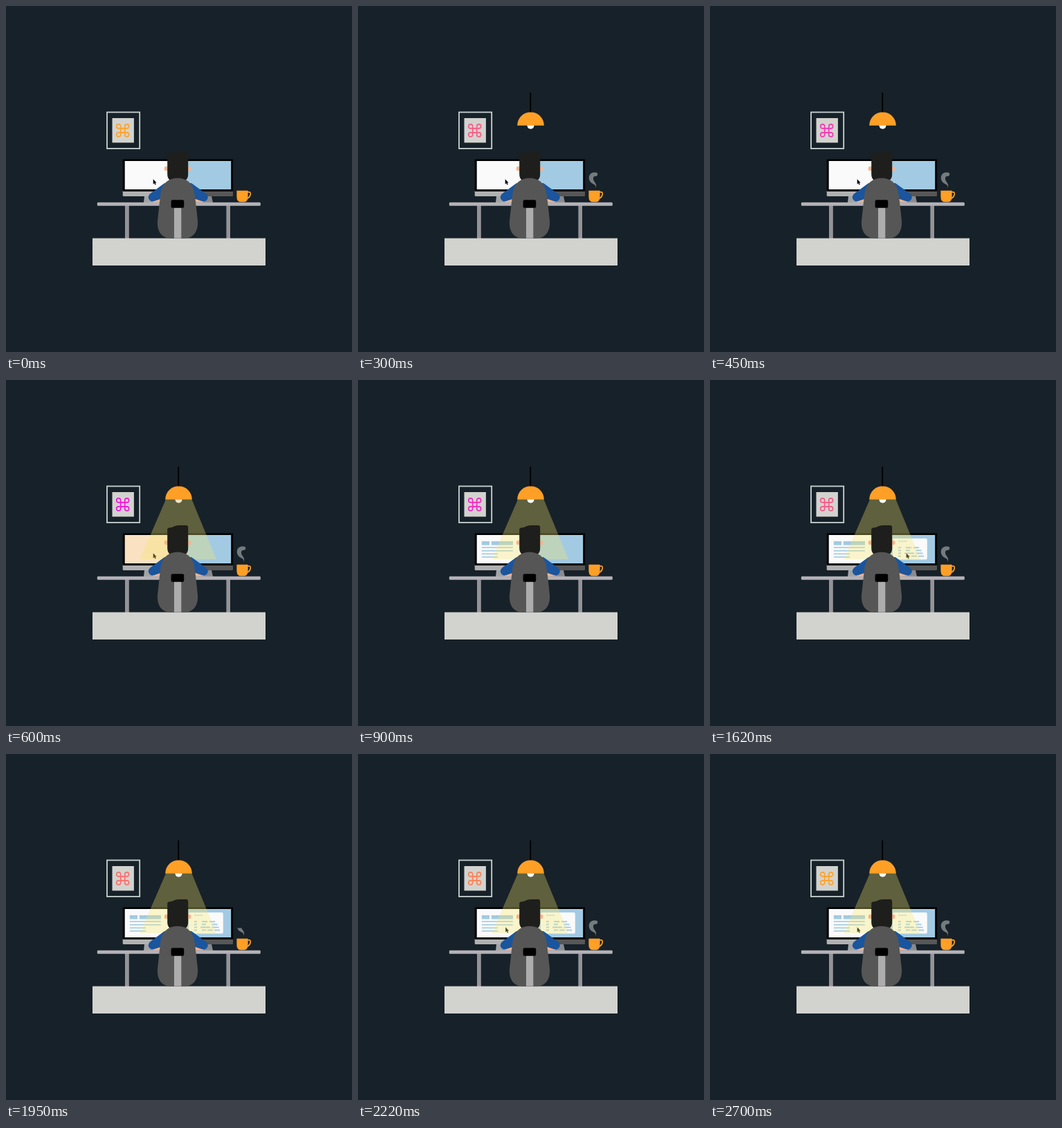
Recreate the animation shown at these times as an HTML page. Size 500 by 500 pixels, loop 2.76 s.

```html
<!DOCTYPE html>
<html lang="en">
<head>
<meta charset="utf-8">
<title>Desk at night</title>
<style>
  html, body { margin: 0; width: 100%; height: 100%; overflow: hidden; background: #172129; }
  svg { display: block; width: 100%; height: 100%; }
</style>
</head>
<body>
<svg viewBox="0 0 500 500">
  <defs>
    <clipPath id="steamClip"><rect id="steamMask" x="330" y="239" width="20" height="25"/></clipPath>
  </defs>

  <!-- picture on the wall -->
  <rect x="146" y="153.5" width="47.2" height="52.5" fill="none" stroke="#c9d3d2" stroke-width="1.8"/>
  <rect x="153.5" y="162" width="31.4" height="35.5" fill="#d2d3cf"/>
  <path id="knot" transform="translate(168.7 179.9)" fill="none" stroke-width="1.6"
    d="M-3-6a3 3 0 1 0-3 3H6a3 3 0 1 0-3-3V6a3 3 0 1 0 3-3H-6a3 3 0 1 0 3 3z"/>

  <!-- monitors -->
  <path fill="#a4a4a6" d="M200 275h48v9h-49z"/>
  <path fill="#8b8b8e" d="M248 275h49l2 9h-51z"/>
  <path fill="#b1b1b1" d="M168.7 267h80v8h-78.500q-1.500 0-1.500-1.500z"/>
  <path fill="#575757" d="M248 267h80v6.500q0 1.500-1.500 1.500H248z"/>
  <rect x="168.700" y="221.400" width="159.500" height="46.600" rx="1.200"/>
  <rect id="leftScreen" x="171.700" y="224" width="76" height="41" fill="#fafafa"/>
  <rect x="250" y="224" width="75.200" height="41" fill="#a2cae3"/>
  <g id="page" fill="#a2cae3"></g>
  <g id="panel">
    <rect x="264" y="229" width="49.800" height="30.500" rx="2" fill="#fafafa"/>
    <g id="panelRows" fill="#a2cae3"></g>
  </g>
  <path id="cursor" d="M212.700 250.200v7.200l1.600-1.300 1.200 2.500 1.200-.6-1.100-2.400 2-.2z"/>

  <!-- lamp -->
  <path id="beam" d="M231 172.500h37.500L304 259H193.500z" fill="#f4e667" opacity=".32"/>
  <g id="lamp">
    <path d="M249.200 125v30" stroke="#000" stroke-width="1.800"/>
    <circle id="bulb" cx="249.500" cy="172.800" r="5" fill="#fff"/>
    <path d="M230.200 172.700a19.300 19.300 0 0 1 38.600 0z" fill="#ff9f26"/>
  </g>

  <!-- desk and floor -->
  <path fill="#959398" d="M172 288h5.800v48H172zM318.400 288h5.600v48h-5.600z"/>
  <rect x="131.800" y="283.700" width="236" height="5.100" rx="1.200" fill="#b4b1b7"/>
  <rect x="125" y="335.600" width="250" height="39.400" fill="#d2d3cf"/>

  <!-- cup -->
  <path d="M349 268.800h2.200q2.500 0 2 3.200-.8 5-5.200 6.200" fill="none" stroke="#ff9f26" stroke-width="1.700"/>
  <path d="M333.400 266.700h16.200v8.300q0 8.300-5.500 8.300h-5.200q-5.500 0-5.500-8.300z" fill="#ff9f26"/>
  <path id="steam" clip-path="url(#steamClip)" fill="#747b7c"
    d="M343 263C344.500 259.500 342 258 338.500 256.500C333 253.500 332 245 337 241.800C340 240 345 240.200 346.200 242C346.700 244.500 345 246.200 343 246C340.500 246 339.700 248 340 250.500C341 254.500 345.500 256.500 343.900 261.500z"/>

  <!-- person and chair -->
  <g fill="#f5b48c">
    <circle cx="232" cy="235" r="3.300"/><circle cx="264.300" cy="235" r="3.300"/>
    <path d="M212 281l12-3h48l13 3v2.500h-73z"/>
  </g>
  <path fill="#1a559d" d="M229 256l-19 14q-6 4-3.500 9 2.500 4.500 7.500 3l15-5h39l15 5q5 1.500 8-2.500 2.500-5-3-9l-20-14.500z"/>
  <path fill="#1e1e1c" d="M233.200 216q0-2.500 3-2.500 4 0 6-1.800 3-1.700 8-1.700h10q3 0 3 3v30q0 12-15 12t-15-12z"/>
  <path fill="#565656" d="M248 248.700c15 0 23 9 25 25l3.500 32c3 19-5 30-19 30h-19c-14 0-22-11-19-30l3.500-32c2-16 10-25 25-25z"/>
  <rect x="243" y="290" width="10.300" height="45.600" fill="#adadad"/>
  <rect x="238.600" y="280.300" width="18.600" height="11.500" rx="2"/>
</svg>
<script>
  const LOOP = 2760;
  const el = id => document.getElementById(id);
  const clamp = x => Math.min(1, Math.max(0, x));
  const progress = (t, from, to) => clamp((t - from) / (to - from));
  const easeOut = p => 1 - (1 - p) ** 3;
  const easeInOut = p => p * p * (3 - 2 * p);

  function addBar(parent, x, y, width, height) {
    const bar = document.createElementNS('http://www.w3.org/2000/svg', 'rect');
    const attributes = { x, y, width, height };
    for (const name in attributes) bar.setAttribute(name, attributes[name]);
    parent.append(bar);
    return { bar, width };
  }

  const pageBars = [
    [178.8, 233, 11.2, 5.6], [192.8, 233, 31.2, 5.6],
    [178.8, 241.3, 45, 1.6], [178.8, 246, 45, 1.6],
    [178.8, 250.5, 23.200, 1.6], [178.8, 255, 23.200, 1.6]
  ].map(box => addBar(el('page'), ...box));

  for (let i = 0; i < 3; i++) addBar(el('panelRows'), 272.5 + i * 4.2, 232.4, 3, 1.3);
  const rows = [
    [272, 4, 283, 8, 294, 8],
    [272, 4, 283, 6, 297.500, 8],
    [272, 4, 281, 14, 297.500, 10],
    [272, 4, 283, 6, 291, 8, 301, 8]
  ];
  rows.forEach((row, r) => {
    for (let i = 0; i < row.length; i += 2) {
      addBar(el('panelRows'), row[i], 241.3 + r * 4.1, row[i + 1], 1.9);
    }
  });

  const ORANGE = [255, 160, 38], MAGENTA = [245, 14, 225];

  function draw(t) {
    const mix = t < 600 ? t / 600 : 1 - progress(t, 600, 2700);
    const color = ORANGE.map((c, i) => Math.round(c + (MAGENTA[i] - c) * mix));
    el('knot').setAttribute('stroke', `rgb(${color})`);

    const drop = -180 * (1 - easeOut(progress(t, 0, 290)));
    el('lamp').setAttribute('transform', `translate(0 ${drop})`);
    el('beam').setAttribute('visibility', t < 540 ? 'hidden' : 'visible');

    // Warm flash as the light comes on
    const flash = t >= 600 && t < 630;
    el('leftScreen').setAttribute('fill', flash ? '#fae1c1' : '#fafafa');
    el('bulb').setAttribute('fill', flash ? '#fae1c1' : '#fff');

    pageBars.forEach(({ bar, width }, i) => {
      const start = 640 + i * 30;
      bar.setAttribute('width', width * easeOut(progress(t, start, start + 110)));
    });
    el('panel').setAttribute('opacity', progress(t, 1080, 1200));

    const across = easeInOut(progress(t, 640, 1160)) - easeInOut(progress(t, 1650, 2250));
    el('cursor').setAttribute('transform', `translate(${71 * across} 0)`);

    const puff = t % (LOOP / 3);
    const height = puff < 875 ? 24 * progress(puff, 0, 220) : 0;
    el('steamMask').setAttribute('y', 263.5 - height);
    el('steamMask').setAttribute('height', height);
  }

  function tick() {
    draw(performance.now() % LOOP);
    requestAnimationFrame(tick);
  }
  tick();
</script>
</body>
</html>
```
